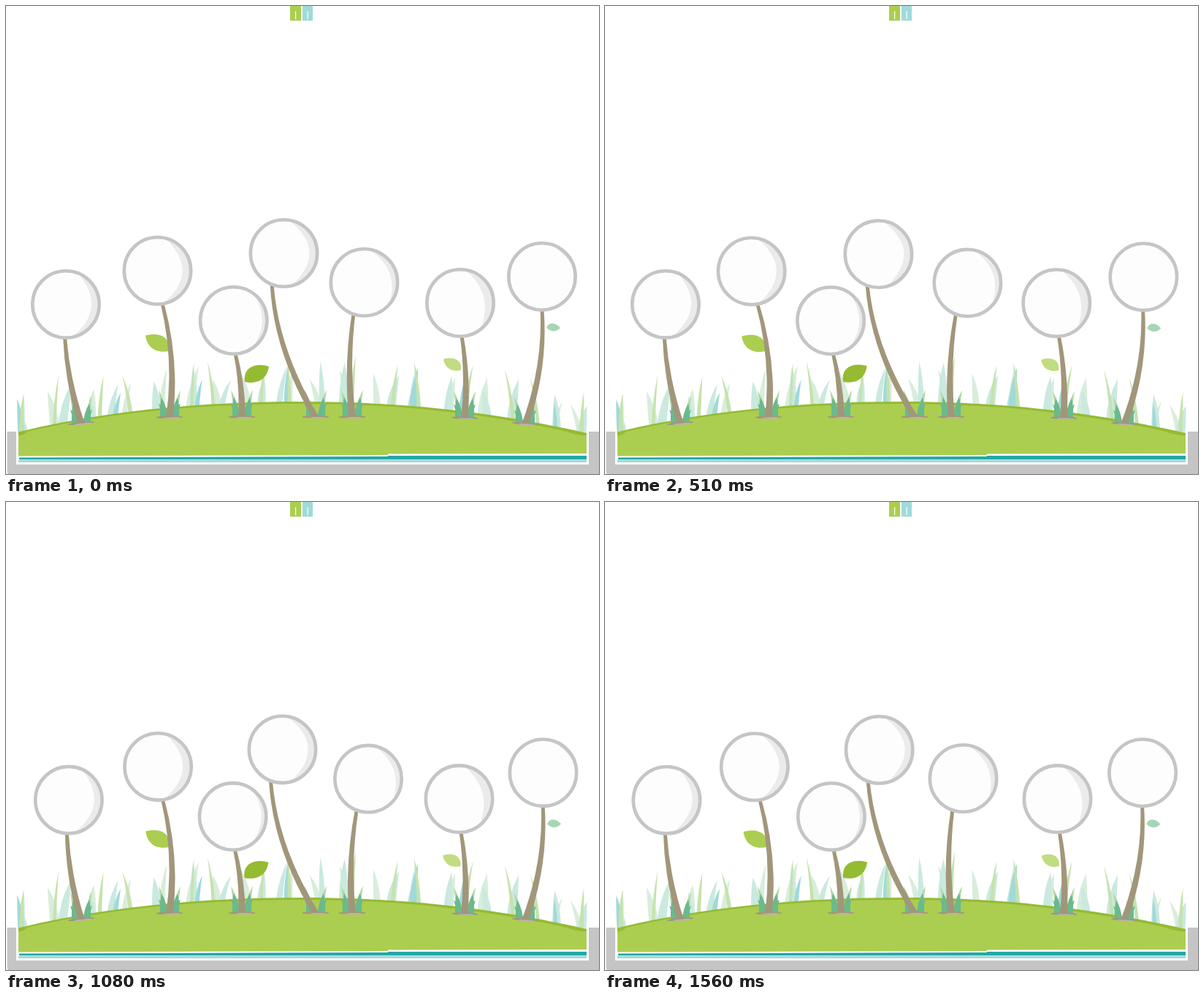
These frames come from a looping animation (812x640 px, 1.59 s). An HTML page:

```html
<!DOCTYPE html>
<html lang="en">
<head>
<meta charset="utf-8">
<title>Swaying flowers</title>
<style>
html, body { margin: 0; width: 100%; height: 100%; overflow: hidden; background: #fff; }
svg { display: block; width: 812px; height: 640px; }
.ring { fill: none; stroke: #c5c5c5; stroke-width: 4.6; }
.disc { fill: #fdfdfd; }
.shade { fill: #ebebeb; }
.stem { fill: #a2967a; }
</style>
</head>
<body>
<svg viewBox="0 0 812 640">
  <path fill="#abce50" fill-rule="evenodd" d="M389 0H404V20H389ZM396 7V18H397.2V7Z"/>
  <path fill="#a0dada" fill-rule="evenodd" d="M406 0H420V20H406ZM412.5 7V18H413.7V7Z"/>
  <path fill="#c5c5c5" d="M1.5 582H14V627H798V582H812V640H4Q1.5 640 1.5 636Z"/>
  <g id="grass"></g>
  <path fill="#94bb31" d="M17 582.5C150 550 290 541 405 541C530 541 660 553 795 584V600H17Z"/>
  <path fill="#abce50" d="M17 588Q24 587 29 582C160 552 290 544 405 544C530 544 650 556 768 582Q782 588 795 587V612L523 612.5V614L17 615.5Z"/>
  <path fill="#27a6a6" d="M18 617.5L523 616V615H795V620.3H18Z"/>
  <path fill="#a0dada" d="M17 620.7H795V624H17Z"/>
  <g id="tufts"></g>
  <g id="flowers"></g>
</svg>
<script>
const LOOP = 1590, STEP = 30, TAU = 2 * Math.PI, DEG = Math.PI / 180;
const MID = 405, R = 45;
const $ = id => document.getElementById(id);

function add(parent, tag, attrs) {
  const el = document.createElementNS('http://www.w3.org/2000/svg', tag);
  for (const k in attrs) el.setAttribute(k, attrs[k]);
  return parent.appendChild(el);
}

let seed = 7;
function random(lo, hi) {
  seed = (seed * 16807) % 2147483647;
  return lo + (hi - lo) * seed / 2147483647;
}

const hill = x => 541 + 41 * Math.abs((x - MID) / 390) ** 1.9;

// Pointed blade standing on x, y; the tip is given relative to its foot.
function blade(x, y, w, dx, dy) {
  const h = w / 2, mx = x + dx / 4, my = y + dy * 0.55;
  return `M${x - h} ${y}Q${mx - h} ${my} ${x + dx} ${y + dy}Q${mx + h} ${my} ${x + h} ${y}Z`;
}

function sow({ fill, count, width, height, lean }) {
  let d = '';
  for (let i = 0; i < count; i++) {
    const x = 21 + 767 * Math.min(1, Math.max(0, (i + random(-0.3, 0.3)) / (count - 1)));
    const side = random(-1, 1) < 0 ? -1 : 1;
    d += blade(x, hill(x) + 4, random(...width), side * random(1, lean), -random(...height));
  }
  add($('grass'), 'path', { fill, d });
}

[
  { fill: '#d8eddb', count: 18, width: [7, 15], height: [34, 62], lean: 13 },
  { fill: '#cae9df', count: 18, width: [8, 13], height: [32, 62], lean: 14 },
  { fill: '#a0dada', count: 7, width: [5, 11], height: [34, 58], lean: 10 },
  { fill: '#c6e2ad', count: 15, width: [4, 6], height: [52, 72], lean: 12 }
].forEach(sow);

// base x; head centre; stem top and bend x; sway: reach, period, rightmost time;
// shade: start and end angle, inner radius; leaf: colour, tip, joint
const flowers = [
  { x: 103, head: [82, 408], stem: [80.5, 84], sway: [2.5, 718, 1000], shade: [-67, 78, 35] },
  { x: 224, head: [207.5, 362], stem: [214, 234], sway: [4.1, 1400, 1215], shade: [-76, 79, 34],
    leaf: ['#abce50', [191, 450.5], [223, 472]] },
  { x: 323, head: [311.7, 430], stem: [314, 324], sway: [1.7, 960, 870], shade: [-52, 54, 39],
    leaf: ['#94bb31', [360, 493], [327, 514]] },
  { x: 424, head: [380.5, 338], stem: [364, 369.5], sway: [4.6, 1000, 870], shade: [-80, 75, 35] },
  { x: 474, head: [490.5, 378], stem: [476, 466], sway: [4, 1600, 780], shade: [-80, 40, 37] },
  { x: 628, head: [622, 406], stem: [624, 633], sway: [2.4, 960, 870], shade: [-80, 52, 33],
    leaf: ['#c1dc82', [599, 483], [623, 498]] },
  { x: 711, head: [734, 370], stem: [734, 739], sway: [2.1, 940, 1340], shade: [-75, -18, 42],
    leaf: ['#a5d6b6', [759, 440], [740, 440]] }
];

function stemPath(f) {
  const [x, bend] = f.stem, [hx, hy] = f.head;
  const y = hy + Math.sqrt(R * R - (x - hx) ** 2), my = (y + f.y) / 2;
  return `M${x - 2.4} ${y}Q${bend - 3.6} ${my} ${f.x - 4.8} ${f.y}` +
    `H${f.x + 4.8}Q${bend + 3.6} ${my} ${x + 2.4} ${y}Z`;
}

// Crescent between the rim and a curve that bulges to the inner radius.
function shadePath([from, to, inner]) {
  const polar = (deg, r) => `${r * Math.cos(deg * DEG)} ${r * Math.sin(deg * DEG)}`;
  const pull = 2 * inner - R * Math.cos((to - from) / 2 * DEG);
  return `M${polar(from, R)}Q${polar((from + to) / 2, pull)} ${polar(to, R)}` +
    `A${R} ${R} 0 0 0 ${polar(from, R)}Z`;
}

function addLeaf(parent, [fill, [x, y], [jx, jy]]) {
  const dx = jx - x, dy = jy - y, size = Math.hypot(dx, dy);
  add(parent, 'path', {
    fill, d: 'M0 0C.35 -.4 .8 -.45 1 0C.75 .25 .35 .4 0 0Z',
    transform: `translate(${x} ${y}) rotate(${Math.atan2(dy, dx) / DEG}) scale(${size} ${size * Math.sign(dx)})`
  });
}

function addTuft({ x, y }) {
  let back = '', front = '';
  for (const side of [-1, 1]) {
    back += blade(x + 7 * side, y, 7, 8 * side, -37);
    front += blade(x + 8 * side, y, 10, 3 * side, -27) + blade(x + 6 * side, y, 8, 9 * side, -19);
  }
  add($('tufts'), 'path', { fill: '#b3d9a5', d: back });
  add($('tufts'), 'path', { fill: '#6bb98d', d: front });
  const transform = `rotate(${5 * ((x - MID) / 304) ** 3} ${x} ${y})`;
  add($('tufts'), 'ellipse', { cx: x, cy: y, rx: 18.5, ry: 1.8, fill: '#a2967a', transform });
  add($('tufts'), 'ellipse', { cx: x + 3, cy: y + 1, rx: 12, ry: 1.2, fill: '#bdb5aa', transform });
}

for (const f of flowers) {
  f.y = 562 + 9 * ((f.x - MID) / 304) ** 6;
  addTuft(f);
  f.el = add($('flowers'), 'g', {});
  if (f.leaf) addLeaf(f.el, f.leaf);
  add(f.el, 'path', { class: 'stem', d: stemPath(f) });
  const head = add(f.el, 'g', { transform: `translate(${f.head})` });
  add(head, 'circle', { class: 'disc', r: R });
  add(head, 'path', { class: 'shade', d: shadePath(f.shade) });
  add(head, 'circle', { class: 'ring', r: 45.7 });
}

// Each flower tilts rigidly about its base; the loop restarts with a hard cut.
function draw(now) {
  const t = Math.floor(now % LOOP / STEP) * STEP;
  for (const { el, x, y, head, sway: [reach, period, peak] } of flowers) {
    const wave = s => Math.cos(TAU * (s - peak) / period);
    const angle = reach * (wave(t) - wave(0)) / (y - head[1]) / DEG;
    el.setAttribute('transform', `rotate(${angle.toFixed(3)} ${x} ${y})`);
  }
}

const start = performance.now();
function tick() {
  draw(performance.now() - start);
  requestAnimationFrame(tick);
}
tick();
</script>
</body>
</html>
```
